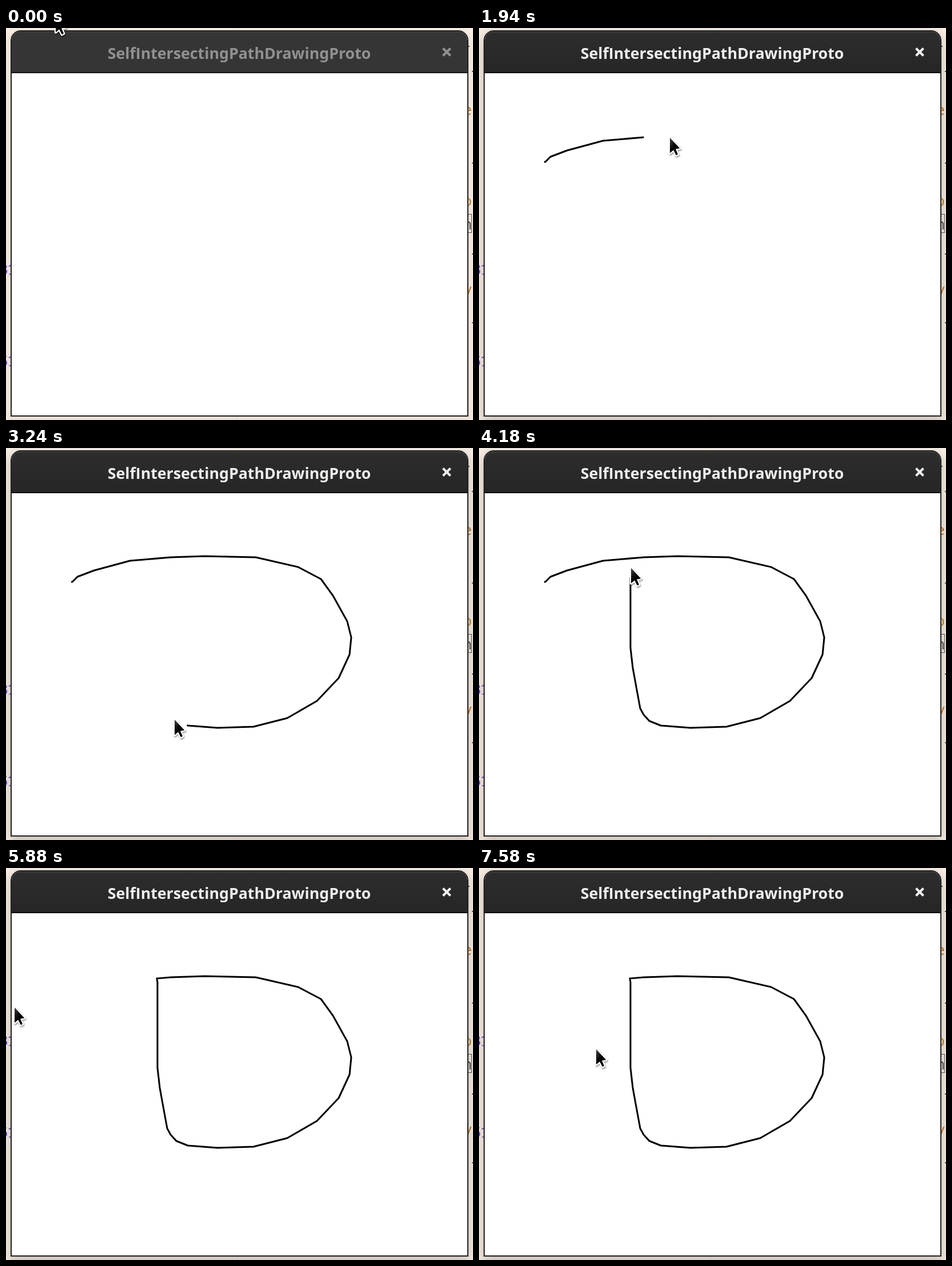
An HTML page that plays this animation: 817 by 685 pixels, repeating every 8 s.

```html
<!DOCTYPE html>
<html lang="en">
<head>
<meta charset="utf-8">
<title>Path drawing</title>
<style>
  html, body { margin: 0; width: 100%; height: 100%; overflow: hidden; }
  body { position: relative; background: #f7ede3; }
  svg { position: absolute; left: 0; top: 0; }
  .code { font: 26px "Noto Sans Mono", monospace; fill: #555; }
  .num { fill: #7546e0; letter-spacing: -2px; }
  .str { fill: #c8761f; }
  .par { fill: #c08a2c; }
  .win {
    position: absolute; left: 8px; top: 4px; width: 801px; height: 675px;
    box-sizing: border-box; border: 2px solid #202220; border-radius: 18px 18px 0 0;
    background: #fff; overflow: hidden;
    box-shadow: 0 4px 12px 4px rgba(0, 0, 0, .07);
  }
  .bar {
    height: 73px; box-sizing: border-box; border-bottom: 2px solid #171717;
    background: #353535; box-shadow: inset 0 2px #3c3e3c;
  }
  .label { font: 700 26.75px "Noto Sans", "Open Sans", sans-serif; fill: #919190; }
  .plain { font-family: "Open Sans", sans-serif; }
  .close { stroke: #919190; stroke-width: 4; }
  .active .win { box-shadow: 0 6px 18px 2px rgba(0, 0, 0, .2); }
  .active .bar { background: linear-gradient(#2d2d2d, #262626); border-color: #0c0c0c; box-shadow: inset 0 2px #3b3e3b; }
  .active .label { fill: #eeeeec; }
  .active .close { stroke: #eeeeec; }
  #line { stroke: #000; stroke-width: 3; stroke-linejoin: round; }
  #cursor path { stroke: #fff; stroke-width: 4.5; stroke-linejoin: round; paint-order: stroke; filter: drop-shadow(1px 2px 1px rgba(0, 0, 0, .4)); }
</style>
</head>
<body>
<svg class="code" width="817" height="685">
  <path d="M404.5 0V685" stroke="#e8ddd2"/>
  <g id="log" class="num">
    <text x="-11.5" y="431">31</text>
    <text x="-11.5" y="591">51</text>
  </g>
  <text class="str" x="799.5" y="152">e</text>
  <text class="par" x="799.5" y="311">o</text>
  <rect x="790.5" y="325.5" width="24" height="32" fill="none" stroke="#555"/>
  <text x="799.5" y="352">n</text>
  <text class="str" x="802" y="470">/c</text>
  <path d="M807 32h4M815 76h2M815 236h2M815 395h2M815 515h2" stroke="#555" stroke-width="2"/>
</svg>

<div class="win"><div class="bar"></div></div>

<svg width="817" height="685">
  <defs>
    <linearGradient id="ink" x2=".6" y2="1">
      <stop offset="0" stop-color="#444"/>
      <stop offset=".6" stop-color="#000"/>
    </linearGradient>
  </defs>
  <text class="label" x="408" y="54" text-anchor="middle">Self<tspan class="plain">I</tspan>ntersectingPathDrawingProto</text>
  <path class="close" d="M764.5 35.5l13 13m0-13l-13 13"/>
  <g fill="none">
    <path id="enter" d="M86-22Q90 140 114 234"/>
    <path id="line" d="M114 234h2L125 225 154 214 217 197 288 191 347 189 437 191 511 208 551 229 572 258 597 303 604 331 601 361 582 402 544 442 492 472 433 487 370 489 318 485 298 477 288 466 282 455 275 417 269 384 265 349V200L264 193 261 163"/>
    <path id="leave" d="M260 163L25 229 14 241"/>
    <path id="back" d="M14 241Q80 424 204 314"/>
  </g>
  <g id="cursor"><path fill="url(#ink)" d="M1 2.8V29.5L7.2 24.3L11.8 33.3L15 31.8L11 22.4L18.3 21.2Z"/></g>
</svg>

<script>
const LOOP = 8000, PRESS = 1940, RELEASE = 4740;
const CUT_FROM = 157, CUT_TO = 1249; // lengths along the line around its crossing

const byId = id => document.getElementById(id);
const line = byId("line"), cursor = byId("cursor"), log = byId("log");

const linear = u => u;
const easeOut = u => 1 - (1 - u) ** 2;

// The pointer follows a path in even steps, the first at start and the last at end.
function leg(id, start, end, steps, ease = easeOut, from = 0, to = byId(id).getTotalLength()) {
  const lengthAt = t => {
    const step = Math.floor((t - start) / (end - start) * (steps - 1) + 1e-6) + 1;
    const u = Math.min(Math.max(step / steps, 0), 1);
    return from + (to - from) * ease(u);
  };
  return { path: byId(id), start, lengthAt };
}

const legs = [
  leg("enter", 120, 560, 7),
  leg("line", PRESS, 3240, 9, linear, 135, 963),
  leg("line", 3480, 4180, 5, linear, 963, 1234),
  leg("line", 4360, 4560, 2, linear, 1234),
  leg("leave", 5160, 5880, 4),
  leg("back", 6980, 7580, 4)
];

// The ink trails the pointer, less so as the hand slows down.
const inked = length => length - (50 - length / 40.6);

function draw(t) {
  const now = legs.filter(l => t >= l.start).pop() || legs[0];
  const length = now.lengthAt(t);
  const { x, y } = now.path.getPointAtLength(length);
  const drawing = t >= PRESS, done = t >= RELEASE;
  const from = done ? CUT_FROM : 0;
  const to = done ? CUT_TO : drawing ? inked(length) : 0;

  cursor.setAttribute("transform", `translate(${Math.round(x)} ${Math.round(y)})`);
  line.style.strokeDasharray = `${to - from} 9999`;
  line.style.strokeDashoffset = -from;
  log.setAttribute("transform", `translate(0 ${done ? -120 : 0})`);
  document.body.classList.toggle("active", drawing);
}

const start = performance.now();
function tick() {
  draw((performance.now() - start) % LOOP);
  requestAnimationFrame(tick);
}
tick();
</script>
</body>
</html>
```
